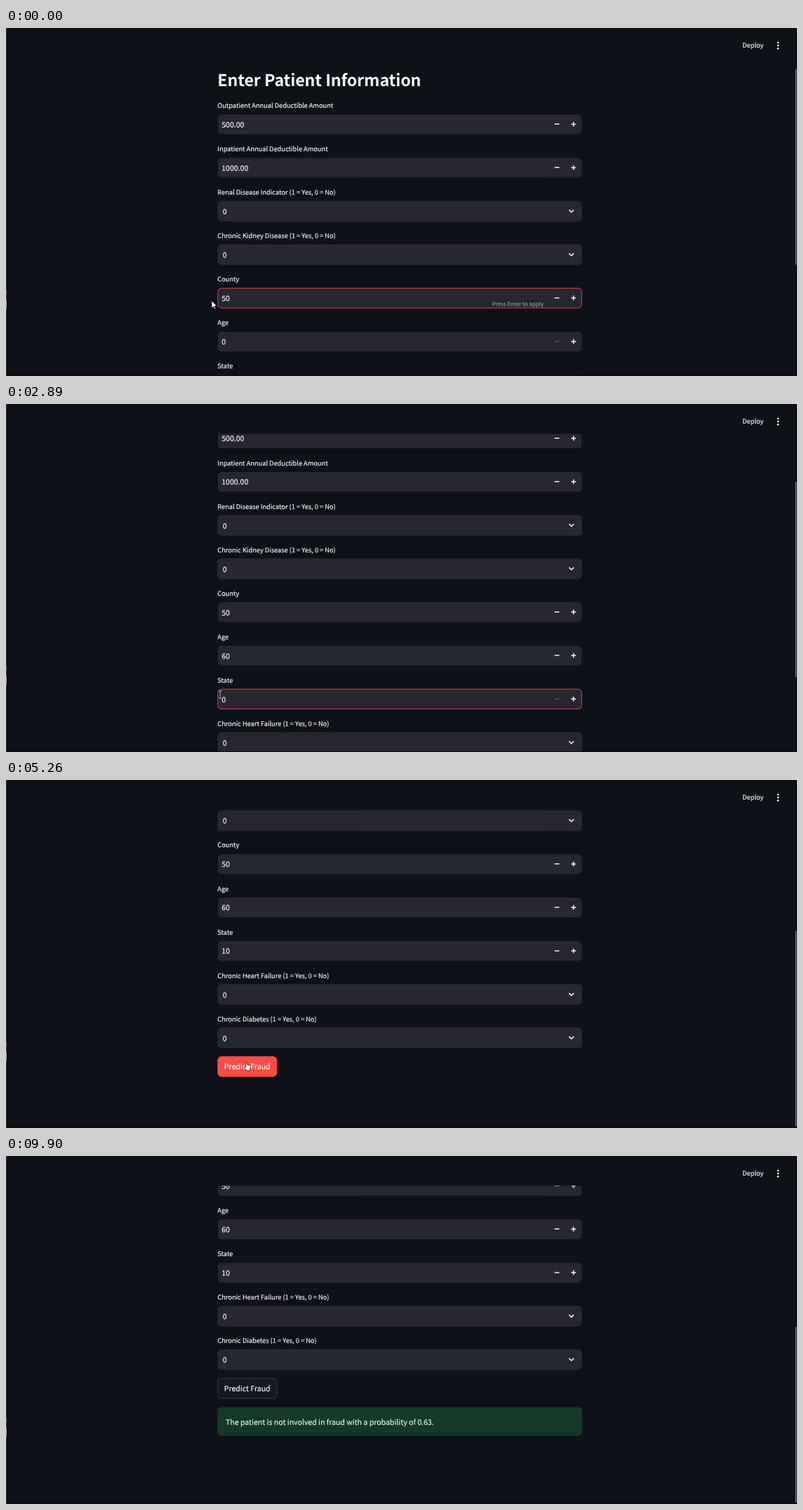
Write an HTML page that moves like this. It is 1127 px wide and 497 px high and loops after 9920 ms.

```html
<!DOCTYPE html>
<html lang="en">
<head>
<meta charset="utf-8">
<title>Patient form</title>
<style>
  html, body { margin: 0; width: 100%; height: 100%; overflow: hidden; background: #0e1117; }
  svg { display: block; width: 100%; height: 100%; }
  text {
    font: 10.56px "Noto Sans CJK JP", "Noto Sans CJK SC", "Noto Sans CJK KR", "Noto Sans CJK TC", "Noto Sans CJK", "Noto Sans", sans-serif;
    color: #fafafa; fill: currentColor; stroke: currentColor; stroke-width: .15;
    text-rendering: geometricPrecision; white-space: pre;
  }
  .title { font-size: 23.2px; font-weight: 600; letter-spacing: -.1px; stroke: none; }
  .label { font-size: 9.25px; }
  .hint { font-size: 7.93px; color: #97989d; text-anchor: end; }
  .mid { text-anchor: middle; }
  .box { fill: #262730; }
  .focus .box { stroke: #ff4b4b; stroke-width: .85; }
  .icon { fill: none; stroke: #fafafa; stroke-width: 1.5; }
  .off { stroke: #66676d; stroke-width: 1.1; }
  .mark { fill: #1f6078; }
  .btn rect { fill: #131720; stroke: #42454c; stroke-width: .8; }
  .btn.hot rect { stroke: #ff4b4b; }
  .btn.hot text { color: #ff4b4b; }
  .btn.down rect { fill: #ff4b4b; }
  .btn.down text { color: #fff; }
  .alert { fill: #173829; }
  .alert + text { color: #dffde9; }
  .cursor path { fill: #fff; stroke: #000; stroke-width: .7; stroke-linejoin: round; }
  .cursor .beam { fill: none; stroke: #c4c5c8; stroke-width: .9; }
</style>
</head>
<body>
<svg viewBox="0 0 1127 497" preserveAspectRatio="none">
  <defs><clipPath id="view"><rect y="42.5" width="1127" height="455"/></clipPath></defs>
  <rect width="1127" height="497" fill="#0e1117"/>
  <g clip-path="url(#view)"><g id="page"></g></g>
  <text class="label mid" x="1064.3" y="28.4">Deploy</text>
  <g fill="#fafafa">
    <circle cx="1100" cy="20.8" r="1.3"/><circle cx="1100" cy="25" r="1.3"/><circle cx="1100" cy="29.2" r="1.3"/>
  </g>
  <rect id="thumb" x="1124.7" width="1.5" rx=".7" fill="#7b7d82"/>
  <rect width="1" height="497" fill="#34373d"/>
  <rect y="375" width="1" height="6" fill="#777"/>
  <rect y="388" width="1" height="13" fill="#a0a0a0"/>
  <rect y="496" width="1127" height="1" fill="#07090d"/>
  <g id="cursor" class="cursor">
    <path d="M0 0V10.4L2.4 8.2 4 11.8 5.6 11.1 4 7.6H7.3Z"/>
    <path transform="translate(-3.5 -.3)" d="M2.6 1.2a.9.9 0 0 1 1.8 0V5l3.6.8q1.2.3 1.1 1.6L8.6 10.5 7.8 13.4H3.4L.4 8.6q-.6-1 .3-1.3.6-.2 1.9 1.1Z"/>
    <path class="beam" d="M-2.2-5.5H-.6L0-5 .6-5.5H2.2M0-5V5M-2.2 5.5H-.6L0 5 .6 5.5H2.2"/>
  </g>
</svg>
<script>
(() => {
  const LOOP = 9920, PITCH = 62.05, FIRST = 122.8, LEFT = 301.3, BUTTON = 660.2;
  const byId = id => document.getElementById(id);

  function add(parent, tag, attrs, text) {
    const el = document.createElementNS('http://www.w3.org/2000/svg', tag);
    for (const k in attrs) el.setAttribute(k, attrs[k]);
    if (text !== undefined) el.textContent = text;
    parent.appendChild(el);
    return el;
  }
  const show = (el, on) => el.setAttribute('visibility', on ? 'visible' : 'hidden');

  // ---- page ----
  const page = byId('page'), yesNo = ' (1 = Yes, 0 = No)';
  const rowTop = i => FIRST + i * PITCH;
  add(page, 'text', { class: 'title', x: LEFT, y: 83.2 }, 'Enter Patient Information');

  function addRow(i, label) {
    const g = add(page, 'g', {});
    add(g, 'text', { class: 'label', x: LEFT, y: rowTop(i) - 8.8 }, label);
    return g;
  }

  function addSelect(i, label) {
    const y = rowTop(i), g = addRow(i, label + yesNo);
    add(g, 'rect', { class: 'box', x: LEFT, y, width: 519.5, height: 29.5, rx: 5.5 });
    add(g, 'text', { x: 308.8, y: y + 19.1 }, '0');
    add(g, 'path', { class: 'icon', d: `M802.2 ${y + 12.9}l3.4 3.4 3.4-3.4` });
  }

  // Returns a function that sets the value and the focus, hint and selection flags
  function addNumber(i, label, value) {
    const y = rowTop(i), g = addRow(i, label);
    add(g, 'rect', { class: 'box', x: 301.9, y: y + .6, width: 518.4, height: 28.3, rx: 5.2 });
    const mark = add(g, 'rect', { class: 'mark', x: 307.2, y: y + 8, width: 6.4, height: 14.5 });
    const text = add(g, 'text', { x: 307.2, y: y + 19.1 });
    const hint = add(g, 'text', { class: 'hint', x: 766, y: y + 25.8 }, 'Press Enter to apply');
    const minus = add(g, 'path', { d: `M781.7 ${y + 14.5}h6.6` });
    add(g, 'path', { class: 'icon', d: `M805.3 ${y + 14.6}h6.6m-3.3-3.3v6.6` });
    const set = (val, focus, typed, marked) => {
      g.setAttribute('class', focus ? 'focus' : '');
      text.textContent = val;
      minus.setAttribute('class', val === '0' ? 'icon off' : 'icon');
      show(hint, typed);
      show(mark, marked);
    };
    set(value, false, false, false);
    return set;
  }

  addNumber(0, 'Outpatient Annual Deductible Amount', '500.00');
  addNumber(1, 'Inpatient Annual Deductible Amount', '1000.00');
  addSelect(2, 'Renal Disease Indicator');
  addSelect(3, 'Chronic Kidney Disease');
  const county = addNumber(4, 'County', '50');
  const age = addNumber(5, 'Age', '0');
  const state = addNumber(6, 'State', '0');
  addSelect(7, 'Chronic Heart Failure');
  addSelect(8, 'Chronic Diabetes');

  const button = add(page, 'g', {});
  add(button, 'rect', { x: 301.7, y: BUTTON + .4, width: 84.2, height: 28.7, rx: 5.5 });
  add(button, 'text', { class: 'mid', x: 343.7, y: BUTTON + 19 }, 'Predict Fraud');
  const result = add(page, 'g', {});
  add(result, 'rect', { class: 'alert', x: LEFT, y: 701.7, width: 519.5, height: 41, rx: 5.5 });
  add(result, 'text', { x: 313, y: 727 }, 'The patient is not involved in fraud with a probability of 0.63.');

  // ---- motion ----
  const STEP = 135.8, OFFSET = 115;
  const sample = t => t < OFFSET ? 0 : OFFSET + STEP * Math.floor((t - OFFSET) / STEP);

  function ease(t, from, to) {
    const f = Math.min(1, Math.max(0, (t - from) / (to - from)));
    return f * f * (3 - 2 * f);
  }

  const scrollAt = (t, s) => 88.5 * ease(s, 360, 950) + (t >= 3430 ? 82.2 : 0) + (t >= 3560 ? 95 : 0)
    + 77.5 * ease(s, 7140, 7740);

  // Pointer hops: start, end, x, y
  const hops = [
    [120, 460, 284, 386], [500, 1080, 343, 355], [1240, 1470, 287, 349],
    [2300, 2640, 345, 414], [2640, 3020, 266, 416], [3020, 3230, 358.5, 382.5],
    [4450, 5000, 342.8, 402], [6900, 7170, 374.5, 411], [7240, 7850, 433, 384],
    [7950, 8125, 551.7, 366], [8130, 8900, 1036, 475], [8950, 9320, 1080, 498]
  ];
  const pointerAt = s => hops.reduce(([x, y], [from, to, nx, ny]) => {
    const f = ease(s, from, to);
    return [x + (nx - x) * f, y + (ny - y) * f];
  }, [293, 389.5]);

  const cursor = byId('cursor'), thumb = byId('thumb');
  const [arrow, hand, beam] = cursor.children;

  function draw(t) {
    const s = sample(t), scroll = scrollAt(t, s), [x, y] = pointerAt(s);
    const within = (a, b) => t >= a && t < b;
    page.setAttribute('transform', `translate(0 ${-scroll})`);

    county('50', t < 390, t < 390, false);
    age(t < 1890 ? '0' : t < 2040 ? '6' : '60', within(1370, 2860), within(1890, 2860), within(1490, 1890));
    state(t < 3840 ? '0' : t < 3960 ? '1' : '10', within(2860, 5100), within(3840, 5100), within(3000, 3840));

    const docY = y + scroll;
    const inside = edge => docY > edge && docY < edge + 29.5;
    const over = x > LEFT && x < 386 && inside(BUTTON);
    const inField = x > 302 && x < 776 && [4, 5, 6].some(i => inside(rowTop(i)));
    button.setAttribute('class', 'btn' + (over || within(5200, 9900) ? ' hot' : '') + (within(5200, 5410) ? ' down' : ''));

    const done = t >= 5690;
    show(result, done);
    thumb.setAttribute('y', 59 + scroll * (done ? .539 : .589));
    thumb.setAttribute('height', done ? 251 : 279);

    const visible = !within(1890, 2330) && !within(3840, 4500) && t < 9330;
    show(arrow, visible && !over && !inField);
    show(hand, visible && over);
    show(beam, visible && inField);
    cursor.setAttribute('transform', `translate(${x} ${y})`);
  }

  function frame(now) {
    draw(now % LOOP);
    requestAnimationFrame(frame);
  }
  draw(0);
  requestAnimationFrame(frame);
})();
</script>
</body>
</html>
```
